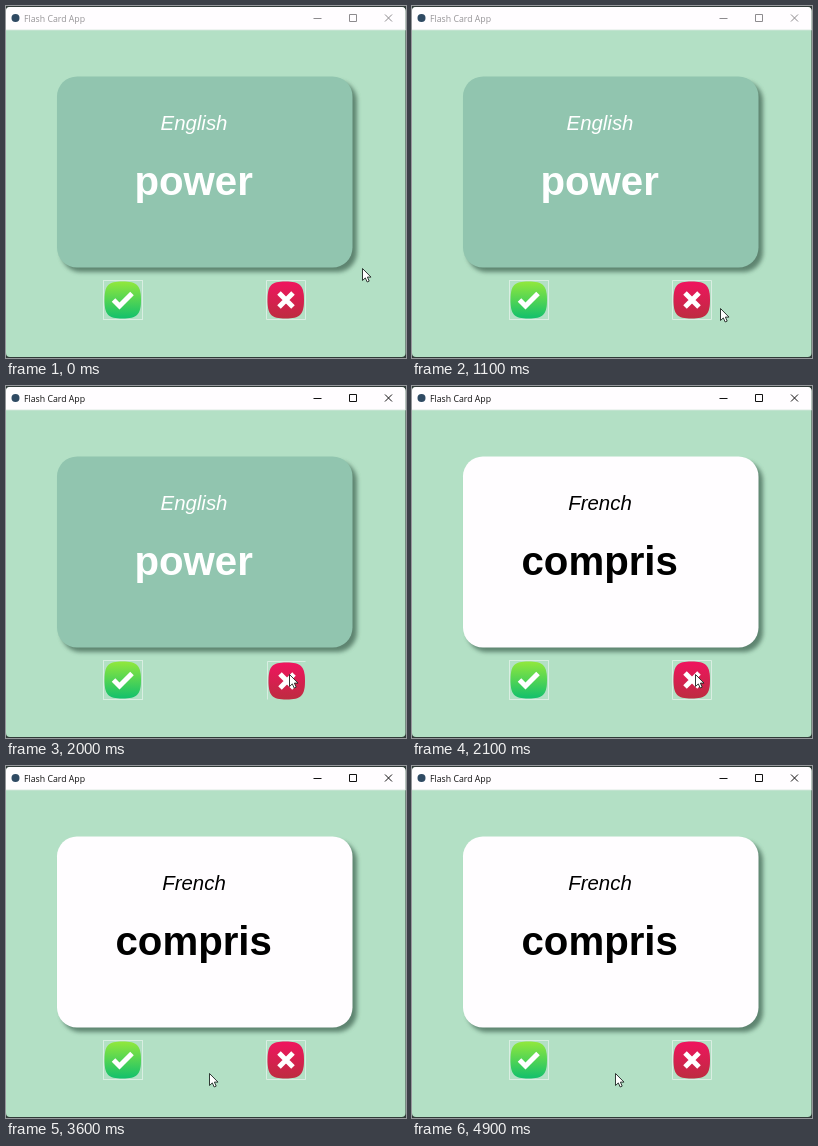
These frames come from a looping animation (400x352 px, 5 s). An HTML page:

```html
<!DOCTYPE html>
<html lang="en">
<head>
<meta charset="utf-8">
<title>Flash Card App</title>
<style>
  html, body { margin: 0; width: 100%; height: 100%; overflow: hidden; background: #303a38; }
  svg { display: block; width: 100vw; height: 100vh; }
  text { font-family: "Liberation Sans", Arial, sans-serif; text-anchor: middle; }
  .bar text { font: 8.75px "Open Sans", sans-serif; text-anchor: start; }
  .lang { font-size: 20.4px; font-style: italic; }
  .word { font-size: 40.2px; font-weight: bold; }
  .mark { fill: none; stroke: #fff; stroke-width: 5; }
  .edge { fill: none; stroke: #d9eee2; }
</style>
</head>
<body>
<svg viewBox="0 0 400 352">
  <defs>
    <linearGradient id="green" x2="0" y2="1">
      <stop offset="0" stop-color="#92e83c"/>
      <stop offset="1" stop-color="#12c06c"/>
    </linearGradient>
    <linearGradient id="red" x2="0" y2="1">
      <stop offset="0" stop-color="#f0145f"/>
      <stop offset="1" stop-color="#bd2c40"/>
    </linearGradient>
    <filter id="blur" x="-10%" y="-10%" width="120%" height="120%">
      <feGaussianBlur stdDeviation="2"/>
    </filter>
    <path id="tile" d="M19.5 1.5C34 1.5 38 5.500 38 20S34 38.500 19.500 38.500S1.500 34.500 1.500 20S5 1.500 19.500 1.500Z"/>
  </defs>

  <rect y="1" width="399.500" height="350" rx="4" fill="#b3e0c5"/>
  <path d="M0 24V5Q0 1 4 1H395.500Q399.500 1 399.500 5V24Z" fill="#fffdff"/>
  <path d="M0 24H399.500" stroke="#d5e6dc" stroke-width=".8"/>
  <circle cx="9.500" cy="12" r="4" fill="#2f4a63"/>
  <g class="bar" id="bar">
    <text x="18" y="15.600">Flash Card App</text>
    <path id="glyphs" fill="none" d="M307.500 12.500H315.500M343.500 8.500H350.500V15.500H343.500ZM379 8.500L386 15.500M386 8.500L379 15.500"/>
  </g>

  <rect x="55" y="75" width="296" height="191" rx="20" fill="#4f7562" opacity=".85" filter="url(#blur)"/>
  <rect id="card" x="51" y="70.500" width="295.500" height="191" rx="20"/>
  <g id="face">
    <text class="lang" id="lang" x="188" y="124"></text>
    <text class="word" id="word" x="187.700" y="189"></text>
  </g>

  <g transform="translate(97 274)">
    <rect class="edge" x=".5" y=".5" width="39" height="39"/>
    <use href="#tile" fill="url(#green)"/>
    <path class="mark" d="M10.500 20L16.500 26L29 13.500"/>
  </g>
  <g transform="translate(260 274)">
    <path class="edge" id="edge"/>
    <g id="wrong">
      <use href="#tile" fill="url(#red)"/>
      <path class="mark" d="M13 13L27 27M27 13L13 27"/>
    </g>
  </g>

  <path id="cursor" d="M.5 .5V12.500L3.300 9.900L5.200 14L7.200 13.100L5.400 9.100H9Z" fill="#fff" stroke="#1c2421" stroke-width=".9"/>
</svg>
<script>
const LOOP = 5000, TICK = 100;
const PRESS = 2000, RELEASE = 2100;

// time, x, y of the pointer tip
const path = [
  [0, 356, 262], [200, 366, 262], [400, 390, 270], [700, 389, 277],
  [900, 361, 307], [1000, 332, 312], [1200, 284, 292], [1300, 280, 287],
  [1800, 280, 287], [2000, 283, 288], [2300, 283, 288], [2800, 203, 307]
];

const $ = id => document.getElementById(id);
const set = (id, name, value) => $(id).setAttribute(name, value);
const ease = p => p * p * (3 - 2 * p);

function pointAt(t) {
  const i = path.findIndex(p => p[0] > t);
  if (i < 0) return path[path.length - 1].slice(1);
  const [t0, x0, y0] = path[i - 1], [t1, x1, y1] = path[i];
  const p = ease((t - t0) / (t1 - t0));
  return [x0 + (x1 - x0) * p, y0 + (y1 - y0) * p];
}

function draw(t) {
  const active = t >= PRESS, flipped = t >= RELEASE;
  const down = active && !flipped;
  const [x, y] = pointAt(t).map(Math.round);

  set('cursor', 'transform', `translate(${x} ${y})`);
  set('bar', 'fill', active ? '#111' : '#979598');
  set('glyphs', 'stroke', active ? '#111' : '#8d8b8e');
  set('card', 'fill', flipped ? '#fffdff' : '#91c5af');
  set('face', 'fill', flipped ? '#000' : '#fff');
  set('wrong', 'transform', down ? 'translate(1 1)' : '');
  set('edge', 'd', down ? 'M1.500 39.500V1.500H39.500' : 'M.5 .5H39.500V39.500H.5Z');
  $('lang').textContent = flipped ? 'French' : 'English';
  $('word').textContent = flipped ? 'compris' : 'power';
}

const start = performance.now();
function frame() {
  const t = (performance.now() - start) % LOOP;
  draw(Math.floor(t / TICK) * TICK);
  requestAnimationFrame(frame);
}
frame();
</script>
</body>
</html>
```
